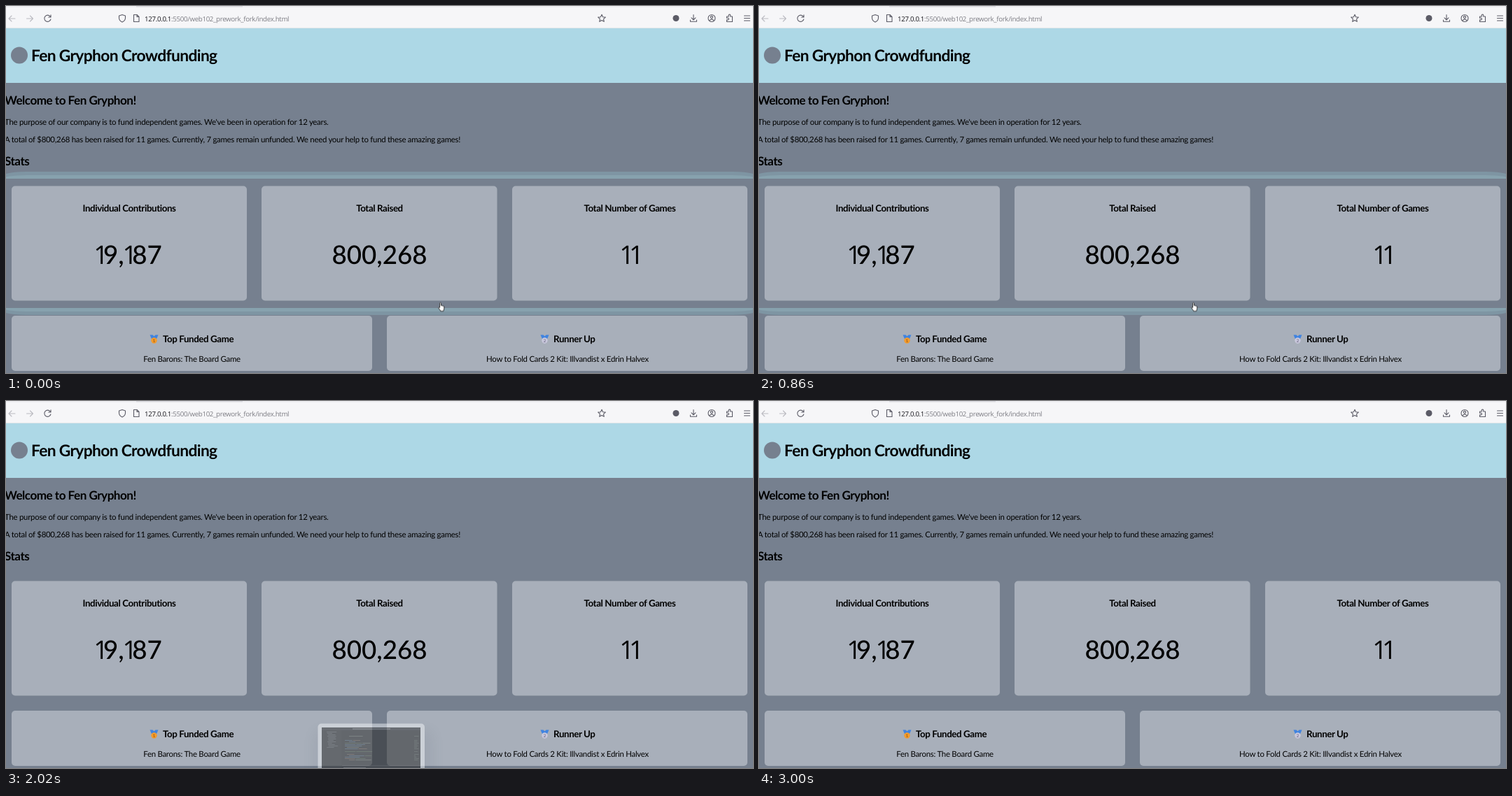
Recreate the animation shown at these times as an HTML page. Size 1067 by 525 pixels, loop 4.26 s.

```html
<!DOCTYPE html>
<html lang="en">
<head>
<meta charset="utf-8">
<title>Crowdfunding page</title>
<style>
  html, body { margin: 0; width: 100%; height: 100%; overflow: hidden; }
  svg { display: block; width: 1067px; height: 525px; background: #76808f; }
  text { font-family: Lato, "Open Sans", sans-serif; text-rendering: geometricPrecision; white-space: pre; }
  .p { font-size: 11.4px; letter-spacing: -.022em; }
  .h { font-weight: 700; font-size: 13.3px; letter-spacing: -.029em; }
  .h1 { font-size: 22.8px; }
  .h2 { font-size: 17.1px; }
  .num { font-size: 36.7px; font-weight: 500; }
  .one { font-family: "Open Sans", sans-serif; font-weight: 400; letter-spacing: -.2em; }
  .mid { text-anchor: middle; }
  .url { font: 9.7px "Open Sans", sans-serif; letter-spacing: -.32px; fill: #7d7d84; }
  .tip { font: 8.6px "Open Sans", sans-serif; letter-spacing: -.05px; fill: #5c6568; }
  .card { fill: #a8afba; }
  .icon { fill: none; stroke: #5b5b66; stroke-width: 1.1; stroke-linecap: round; stroke-linejoin: round; }
  .off { stroke: #bcbcc2; }

  #page, #ring1, #ring2, #hand, #arrow, #preview, #tip { animation: 4260ms step-end infinite; }
  #page { animation-name: page; }
  #ring1 { animation-name: ring1; }
  #ring2 { animation-name: ring2; }
  #hand { animation-name: hand; }
  #arrow { animation-name: arrow; }
  #preview { animation-name: preview; }
  #tip { animation-name: tip; }

  @keyframes page {
    0%, 20.18%, 100% { transform: translateY(0); }
    2.81%, 17.37% { transform: translateY(.5px); }
    11.5% { transform: translateY(1px); }
  }
  @keyframes ring1 { 0% { opacity: 1; } 23%, 100% { opacity: 0; } }
  @keyframes ring2 {
    0%, 26.52%, 70.42%, 100% { opacity: 0; }
    23%, 61.73% { opacity: 1; }
  }
  @keyframes hand {
    0% { opacity: 1; transform: translate(617px, 423.5px); }
    23% { opacity: 1; transform: translate(600px, 490px); }
    26.52% { opacity: 0; transform: translate(600px, 490px); }
    58.92% { opacity: 1; transform: translate(624px, 510px); }
    61.73% { opacity: 1; transform: translate(632px, 496px); }
    64.55% { opacity: 1; transform: translate(640px, 506px); }
    70.42%, 100% { opacity: 0; transform: translate(640px, 506px); }
  }
  @keyframes arrow {
    0% { opacity: 0; transform: translate(433px, 433px); }
    33.8% { opacity: 1; transform: translate(433px, 433px); }
    37.32% { opacity: 1; transform: translate(430px, 447px); }
    40.84% { opacity: 1; transform: translate(430px, 454px); }
    47.41%, 100% { opacity: 0; transform: translate(430px, 454px); }
  }
  @keyframes preview {
    0%, 64.55%, 100% { opacity: 0; transform: none; }
    47.41% { opacity: .5; transform: translateY(8px); }
    50.23% { opacity: .9; transform: translateY(2px); }
    53.05% { opacity: 1; transform: none; }
    61.73% { opacity: .4; transform: none; }
  }
  @keyframes tip {
    0%, 61.73%, 100% { opacity: 0; }
    53.05% { opacity: .5; }
    56.1% { opacity: 1; }
    58.92% { opacity: .95; }
  }
</style>
</head>
<body>
<svg viewBox="0 0 1067 525">
  <defs>
    <g id="edge">
      <path fill="#7e95a3" d="M-12 247A40 10 0 0 1 28 237H1039A40 10 0 0 1 1079 247Z"/>
      <path fill="#87a2ae" d="M-5 247A35 5 0 0 1 30 242H1037A35 5 0 0 1 1072 247Z"/>
    </g>
    <g id="ring">
      <use href="#edge"/>
      <use href="#edge" transform="matrix(1 0 0 -1 0 679)"/>
    </g>
    <path id="ribbon" fill="#3f83e0" d="M-6-6H-2L0-4 2-6H6L3 1H-3Z"/>
    <filter id="soft" x="-30%" y="-40%" width="160%" height="180%"><feGaussianBlur stdDeviation="9"/></filter>
    <clipPath id="view"><rect y="32" width="1067" height="493"/></clipPath>
  </defs>

  <g clip-path="url(#view)">
    <g id="page">
      <rect y="32" width="1067" height="78" fill="#add8e6"/>
      <circle cx="19" cy="70.5" r="12" fill="#76808f"/>
      <text class="h h1" x="36" y="79">Fen Gryphon Crowdfunding</text>
      <text class="h h2" x="-2" y="141">Welcome to Fen Gryphon!</text>
      <text class="p" x="-2" y="170">The purpose of our company is to fund independent games. We've been in operation for 12 years.</text>
      <text class="p" x="-2" y="195">A total of $800,268 has been raised for 11 games. Currently, 7 games remain unfunded. We need your help to fund these amazing games!</text>
      <text class="h h2" x="-2" y="228">Stats</text>

      <use id="ring1" href="#ring"/>
      <g id="ring2"><use href="#ring" y="186"/></g>

      <g class="card">
        <rect x="8" y="257.5" width="336" height="164" rx="5"/>
        <rect x="365" y="257.5" width="336.5" height="164" rx="5"/>
        <rect x="723" y="257.5" width="336" height="164" rx="5"/>
        <rect x="8" y="443" width="515" height="79" rx="5"/>
        <rect x="544" y="443" width="515" height="79" rx="5"/>
      </g>
      <g class="mid">
        <text class="h" x="176" y="294">Individual Contributions</text>
        <text class="h" x="533.5" y="294">Total Raised</text>
        <text class="h" x="891" y="294">Total Number of Games</text>
        <text class="num" x="176" y="368.5"><tspan class="one" dx="-2">1</tspan>9,<tspan class="one" dx="-2">1</tspan>87</text>
        <text class="num" x="533.5" y="368.5">800,268</text>
        <text class="num" x="890" y="368.5"><tspan class="one">11</tspan></text>
        <text class="p" x="265.5" y="509">Fen Barons: The Board Game</text>
        <text class="p" x="802" y="509">How to Fold Cards 2 Kit: Illvandist x Edrin Halvex</text>
      </g>
      <text class="h" x="224" y="481">Top Funded Game</text>
      <text class="h" x="782" y="481">Runner Up</text>
      <g transform="translate(211.5 476.5)">
        <use href="#ribbon"/>
        <circle cy="2" r="4.2" fill="#f39a2b"/>
        <text class="mid" y="4.4" font-size="6" fill="#7c4a10">1</text>
      </g>
      <g transform="translate(769.5 476.5)">
        <use href="#ribbon"/>
        <circle cy="2" r="4.2" fill="#c9c8dc"/>
        <text class="mid" y="4.4" font-size="6" fill="#5e5a78">2</text>
      </g>
    </g>
  </g>

  <g id="preview">
    <rect x="440" y="462" width="170" height="90" rx="14" fill="#3c4654" opacity=".16" filter="url(#soft)"/>
    <rect x="445.5" y="453.5" width="152.5" height="85" rx="5" fill="#eff2f5"/>
    <rect x="451" y="459" width="141" height="70" fill="#1e1f1e"/>
    <rect x="451" y="459" width="141" height="4" fill="#2b2c2c"/>
    <rect x="495" y="460.3" width="54" height="1.6" fill="#6a6c6d"/>
    <rect x="451" y="463" width="28" height="62" fill="#222322"/>
    <g id="code"></g>
  </g>
  <g id="tip">
    <rect x="443" y="428.5" width="157" height="19" rx="2" fill="#98a3a3"/>
    <text class="tip mid" x="521" y="440.5">index.js - Tovlix - Ambrel Drafts Code</text>
  </g>

  <path id="arrow" fill="#fff" stroke="#222" stroke-width=".8" stroke-linejoin="round" d="M.6.6V9.3L2.5 7.5 3.8 10.6 5.2 10 3.9 7H6.5Z"/>
  <path id="hand" fill="#fff" stroke="#222" stroke-width=".9" stroke-linejoin="round" d="M2.6 8V1.5Q3.5.2 4.4 1.5V5Q5.5 4.5 6 5.4 7 4.9 7.4 5.8 8.7 5.5 8.8 6.8V9.5Q8.5 11 7.8 13H3.8Q2.5 10.5.7 8.6.6 7 2.6 8Z"/>

  <rect width="1067" height="32" fill="#f6f6f8"/>
  <rect width="1067" height="2" fill="#efeff2"/>
  <rect x="186" width="152" height="1.5" fill="#d9d9df"/>
  <rect y="31" width="1067" height="1" fill="#dfe5e9"/>
  <g class="icon">
    <path class="off" d="M13 18H4M8 14 4 18 8 22M29.5 18H38.5M34.5 14 38.5 18 34.5 22"/>
    <path d="M63.3 15.2A4.6 4.6 0 1 0 63.9 19M64 12.8V16H60.8"/>
    <path d="M166 12.5 170.5 14V17Q170.5 21 166 23 161.5 21 161.5 17V14Z"/>
    <path d="M182.5 12.5H187L190 15.5V22.5H182.5ZM187 12.5V15.5H190"/>
    <path d="M851 12.3 852.6 15.7 856.3 16.1 853.5 18.6 854.3 22.3 851 20.4 847.7 22.3 848.5 18.6 845.7 16.1 849.4 15.7Z"/>
    <path d="M982 12.5V19.5M979 16.8 982 19.8 985 16.8M977.5 20V22.3H986.5V20"/>
    <circle cx="1008" cy="17.5" r="5"/>
    <circle cx="1008" cy="16" r="1.6"/>
    <path d="M1005 20.7Q1008 17.5 1011 20.7"/>
    <path d="M1029.5 15H1032.3Q1031.8 12 1033.5 12T1034.7 15H1037.5V22.5H1029.5V19.8Q1032.5 20.2 1032.5 18.5T1029.5 17.3Z"/>
    <path d="M1054.5 14H1062.5M1054.5 17.5H1062.5M1054.5 21H1062.5"/>
  </g>
  <circle cx="957" cy="17.5" r="4.5" fill="#5b5b66"/>
  <text class="url" x="198" y="22"><tspan fill="#15141a">127.0.0.1</tspan>:5500/web102_prework_fork/index.html</text>
</svg>
<script>
  const code = document.getElementById("code");
  let seed = 7;
  const rand = () => (seed = seed * 16807 % 2147483647) / 2147483647;

  function bar(x, y, w, fill) {
    const r = document.createElementNS("http://www.w3.org/2000/svg", "rect");
    const attrs = { x, y, width: w, height: .8, fill };
    for (const k in attrs) r.setAttribute(k, attrs[k]);
    code.append(r);
  }

  const tones = ["#43553c", "#456074", "#5d675a", "#665245"];
  for (let y = 465; y < 488; y += 2) bar(458 + rand() * 3, y, 5 + rand() * 10, "#585c5d");
  for (let y = 471; y < 512; y += 2) {
    if (rand() < .4) continue;
    const x = 484 + Math.floor(rand() * 3) * 3;
    const w = 8 + rand() * 18;
    bar(x, y, w, tones[Math.floor(rand() * 4)]);
    if (rand() < .5) bar(x + w + 1, y, 5 + rand() * 18, tones[Math.floor(rand() * 4)]);
    bar(583, y, 2 + rand() * 5, "#465047");
  }
  bar(480, 513, 112, "#444");
  for (let y = 516; y < 525; y += 2) bar(482, y, 15 + rand() * 30, "#747675");
</script>
</body>
</html>
```
